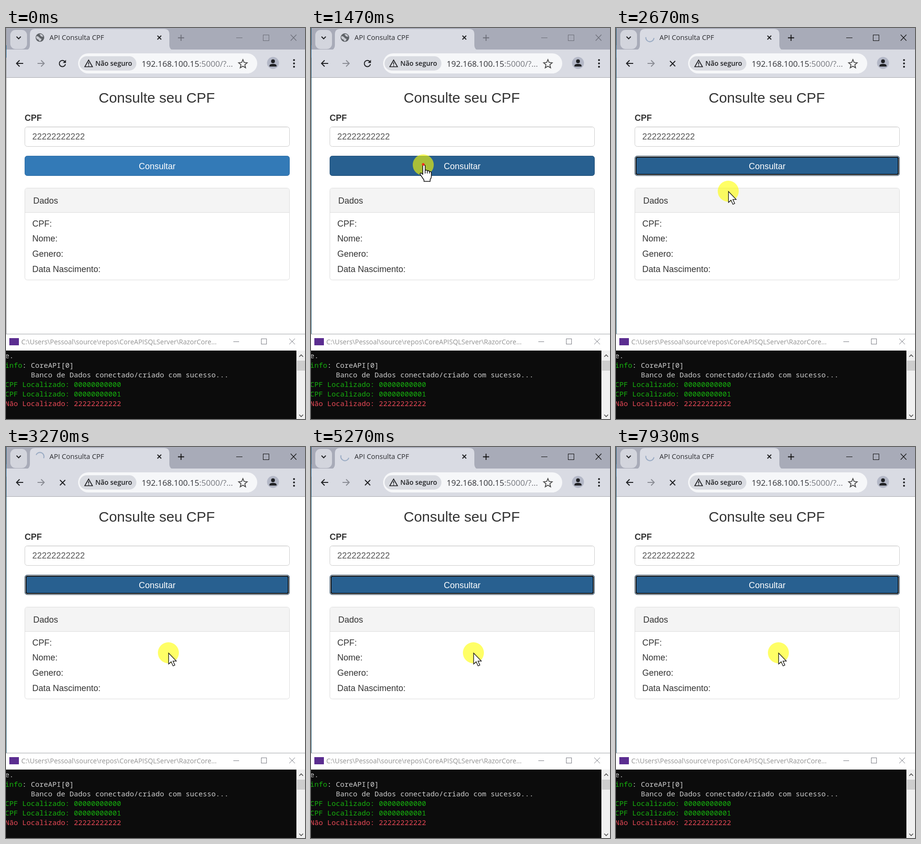
Write an HTML page that moves like this. It is 626 px wide and 817 px high and loops after 8 s.

```html
<!DOCTYPE html>
<html lang="pt-BR">
<head>
<meta charset="utf-8">
<title>API Consulta CPF</title>
<style>
html, body { margin: 0; width: 100%; height: 100%; overflow: hidden; background: #fff; }
svg { display: block; width: 626px; height: 817px; }
text { white-space: pre; }
.ui { font-family: "Open Sans", "Noto Sans", sans-serif; }
.page { font: 18px "Liberation Sans", Arial, sans-serif; fill: #333; }
.term { font: 15px "Noto Sans Mono", "DejaVu Sans Mono", monospace; fill: #ccc; }
.line { fill: none; stroke: #202124; stroke-width: 2; }
.thin { fill: none; stroke: #7c7e86; stroke-width: 1; shape-rendering: crispEdges; }
.cross { shape-rendering: auto; }
.green { fill: #16b00e; }
.red { fill: #e74856; }
</style>
</head>
<body>
<svg viewBox="0 0 626 817">
  <rect width="626" height="640" fill="#fff"/>

  <!-- tab strip -->
  <rect width="626" height="46" fill="#a8abb8"/>
  <rect x="9" y="4" width="35" height="40" rx="11" fill="#d3d5dd"/>
  <path class="line" d="M22 18l4.5 4.5 4.5-4.5"/>
  <path d="M40 46q10 0 10-10V13q0-11 11-11h270q11 0 11 11v23q0 10 10 10z" fill="#d9dbe3"/>
  <g id="globe">
    <circle cx="71" cy="20" r="9" fill="#5f6368"/>
    <path d="M64 17q4 0 6 3t4 2q1 3-3 6-3-2-3-4-4 0-5-5zM70 13q3-1 6 1l2 4q-3 1-5-1t-3-4z" fill="#c9cbd2"/>
  </g>
  <path id="spinner" fill="none" stroke="#9bacc4" stroke-width="2.2"/>
  <text class="ui" x="91" y="25" font-size="14.5" fill="#2a2b2f">API Consulta CPF</text>
  <path class="line" stroke-width="1.8" d="M317 16l8 8m0-8l-8 8"/>
  <g id="caption" fill="none" stroke="#6c6e78">
    <path d="M360 20.5h13M366.5 14v13" stroke-width="1.8"/>
    <path d="M482 20.5h13M538.5 14.5h12v12h-12z" shape-rendering="crispEdges"/>
    <path d="M596 14l12 12.5m0-12.5l-12 12.5" stroke-width="1.2"/>
  </g>

  <!-- toolbar -->
  <rect y="45" width="626" height="58" fill="#d9dbe3"/>
  <rect y="103" width="626" height="1" fill="#a9abb1"/>
  <path class="line" d="M36 74H22m6.500-6.500L22 74l6.500 6.500"/>
  <path class="line" style="stroke:#8b8d95" d="M66 74h14m-6.500-6.500L80 74l-6.500 6.500"/>
  <g id="reload">
    <path class="line" d="M123.500 70.500A6.500 6.500 0 1 0 124.500 75.500"/>
    <path d="M125.500 66.500v6.500h-6.500z" fill="#202124"/>
  </g>
  <path id="stop" class="line" d="M113 69l11 11m0-11l-11 11"/>
  <rect x="151" y="53" width="375" height="42" rx="21" fill="#f6f7f9"/>
  <rect x="154" y="59" width="119" height="30" rx="15" fill="#d9dbe1"/>
  <path class="line" style="stroke-width:1.700" d="M173 67l-8 14h16zM173 71.500v5m0 1.500v1.700"/>
  <text class="ui" x="187" y="79" font-size="14" font-weight="600" fill="#202124">Não seguro</text>
  <text class="ui" x="284" y="81" font-size="17" fill="#303136">192.168.100.15<tspan fill="#74767d">:5000/?...</tspan></text>
  <path class="line" style="stroke:#444;stroke-width:1.700" d="M496 66l2.500 6 6.500.6-5 4.200 1.600 6.400-5.600-3.500-5.600 3.500 1.600-6.400-5-4.200 6.500-.6z"/>
  <circle cx="559" cy="73" r="12.500" fill="#b3b7c6"/>
  <g fill="#202124">
    <circle cx="559" cy="69.500" r="4"/>
    <path d="M551.500 80.500v-1.500q0-4 7.500-4t7.500 4v1.500z"/>
    <circle cx="603" cy="67" r="2"/><circle cx="603" cy="74" r="2"/><circle cx="603" cy="81" r="2"/>
  </g>

  <!-- page -->
  <g class="page">
    <text x="194" y="156" font-size="30" style="font-size:30px">Consulte seu CPF</text>
    <text x="39" y="194" font-weight="700" style="font-weight:700">CPF</text>
    <rect x="39.500" y="206.500" width="554" height="41" rx="5" fill="#fff" stroke="#ccc"/>
    <path d="M42 207.500h549" stroke="#ececec"/>
    <text x="55" y="233" fill="#555">22222222222</text>
    <rect id="button" x="39.500" y="267.500" width="554" height="41" rx="5"/>
    <g id="ring" fill="none">
      <rect x="40.500" y="268.500" width="552" height="39" rx="4" stroke="#fff"/>
      <rect x="42" y="270" width="549" height="36" rx="3" stroke="#101010" stroke-width="2"/>
    </g>
    <text x="278" y="295" fill="#fff">Consultar</text>
    <rect x="39.500" y="334.500" width="554" height="192" rx="5" fill="#fff" stroke="#ddd"/>
    <path d="M40 385v-46q0-4 4-4h545q4 0 4 4v46z" fill="#f4f4f4"/>
    <path d="M40 385.500h553" stroke="#ddd"/>
    <text x="57" y="367">Dados</text>
    <text x="55" y="415">CPF:</text>
    <text x="55" y="446">Nome:</text>
    <text x="55" y="478">Genero:</text>
    <text x="55" y="510">Data Nascimento:</text>
  </g>
  <rect id="edge" width="1" height="640"/>
  <rect y="36" width="1" height="26" fill="#2b6d96"/>
  <rect y="639" width="626" height="1" fill="#a3a5aa"/>

  <!-- console -->
  <rect y="640" width="626" height="34" fill="#fff"/>
  <rect x="7" y="648" width="20" height="15" fill="#5b2d90"/>
  <text class="ui" x="32" y="661" font-size="14" fill="#929292">C:\Users\Pessoal\source\repos\CoreAPISQLServer\RazorCore...</text>
  <path class="thin" d="M476 655.500h12M534.500 649.500h11v11h-11z"/>
  <path class="thin cross" d="M593 649l12 12m0-12l-12 12"/>
  <rect y="674" width="609" height="143" fill="#0c0c0c"/>
  <g class="term">
    <text x="-2" y="690">e.</text>
    <text x="-2" y="710"><tspan class="green">info</tspan>: CoreAPI[0]</text>
    <text x="52" y="730">Banco de Dados conectado/criado com sucesso...</text>
    <text x="-2" y="750" class="green">CPF Localizado: 00000000000</text>
    <text x="-2" y="770" class="green">CPF Localizado: 00000000001</text>
    <text x="-2" y="790" class="red">Não Localizado: 22222222222</text>
  </g>
  <rect x="608" y="674" width="18" height="143" fill="#f0f0f0"/>
  <rect x="609" y="695" width="17" height="21" fill="#cdcdcd"/>
  <path class="line" style="stroke:#505050;stroke-width:1.600" d="M614 687l4-4 4 4M614 808l4 4 4-4"/>

  <!-- pointer -->
  <g id="pointer">
    <circle r="22" fill="#ff0" fill-opacity=".6"/>
    <path id="hand" fill="#fff" stroke="#111" stroke-width="1.500" stroke-linejoin="round"
      d="M-1 3Q-1 0 1.500 0T4 3v9q2-2 4.500 0v1q2-2 4.500.5v1q4-1.500 4 2.500v7q0 4-2.500 6.500v4H1.500v-3L-6 20.500q-1.500-3 1-3.500 2 0 4 3zM4 12v6m4.500-5v5m4.500-4v4"/>
    <path id="arrow" fill="#fff" stroke="#111" stroke-width="1.300" d="M.5.500v23l5.300-4.800 4 8.800 3.800-1.800-4-8.400h7z"/>
    <circle id="click" cy="-1" r="2.800" fill="#f0301c"/>
  </g>
</svg>
<script>
const LOOP = 8000, STEP = 1000 / 15;
const ENTER = 400, HOVER = 465, ACTIVATE = 1465, PRESS = 1530, RELEASE = 1665, LOAD = 1700, LEAVE = 2530;
const el = id => document.getElementById(id);
const show = (id, on) => el(id).setAttribute('display', on ? 'inline' : 'none');
const set = (id, attrs) => Object.entries(attrs).forEach(([k, v]) => el(id).setAttribute(k, v));

// time, x, y
const path = [
  [400, 510, 256], [467, 452, 272], [733, 276, 271], [867, 276, 271], [1000, 233, 284],
  [1067, 235, 286], [2333, 235, 286], [2667, 235, 341], [2800, 240, 350],
  [3133, 339, 434], [3267, 340, 430]
];

function pointerAt(t) {
  const i = path.findIndex(p => p[0] > t);
  if (i < 0) return path[path.length - 1].slice(1);
  if (i === 0) return path[0].slice(1);
  const [t0, x0, y0] = path[i - 1], [t1, x1, y1] = path[i];
  const u = (t - t0) / (t1 - t0);
  return [x0 + (x1 - x0) * u, y0 + (y1 - y0) * u];
}

// Counter-clockwise arc, growing to a half turn and then spinning.
function spinnerArc(elapsed) {
  const sweep = elapsed / 1320 * 360, end = 90 + sweep, start = Math.max(90, end - 180);
  const point = deg => {
    const a = deg * Math.PI / 180;
    return `${71 + 8.6 * Math.cos(a)} ${20 - 8.6 * Math.sin(a)}`;
  };
  return `M${point(start)}A8.6 8.6 0 0 0 ${point(end)}`;
}

function buttonColors(t, hover) {
  if (t >= PRESS && t < RELEASE) return { fill: '#204d74', stroke: '#122b40' };
  if (t >= PRESS) return { fill: '#286090', stroke: hover ? '#204d74' : '#122b40' };
  return hover ? { fill: '#286090', stroke: '#204d74' } : { fill: '#337ab7', stroke: '#2e6da4' };
}

function draw(now) {
  const t = Math.floor((now % LOOP + 3.4) / STEP) * STEP;
  const hover = t >= HOVER && t < LEAVE, active = t >= PRESS, loading = t >= LOAD;
  const [x, y] = pointerAt(t);
  show('pointer', t >= ENTER - 1);
  set('pointer', { transform: `translate(${Math.round(x)} ${Math.round(y)})` });
  show('hand', hover);
  show('arrow', !hover);
  show('click', t >= ACTIVATE && t < RELEASE);
  set('button', buttonColors(t, hover));
  show('ring', active);
  set('edge', { fill: t >= ACTIVATE ? '#1c5670' : '#98999c' });
  set('caption', { stroke: active ? '#111' : '#6c6e78' });
  show('globe', !loading);
  show('reload', !loading);
  show('stop', loading);
  show('spinner', loading);
  if (loading) set('spinner', { d: spinnerArc(t - LOAD) });
}

const begin = performance.now();
function tick() {
  draw(performance.now() - begin);
  requestAnimationFrame(tick);
}
tick();
</script>
</body>
</html>
```
